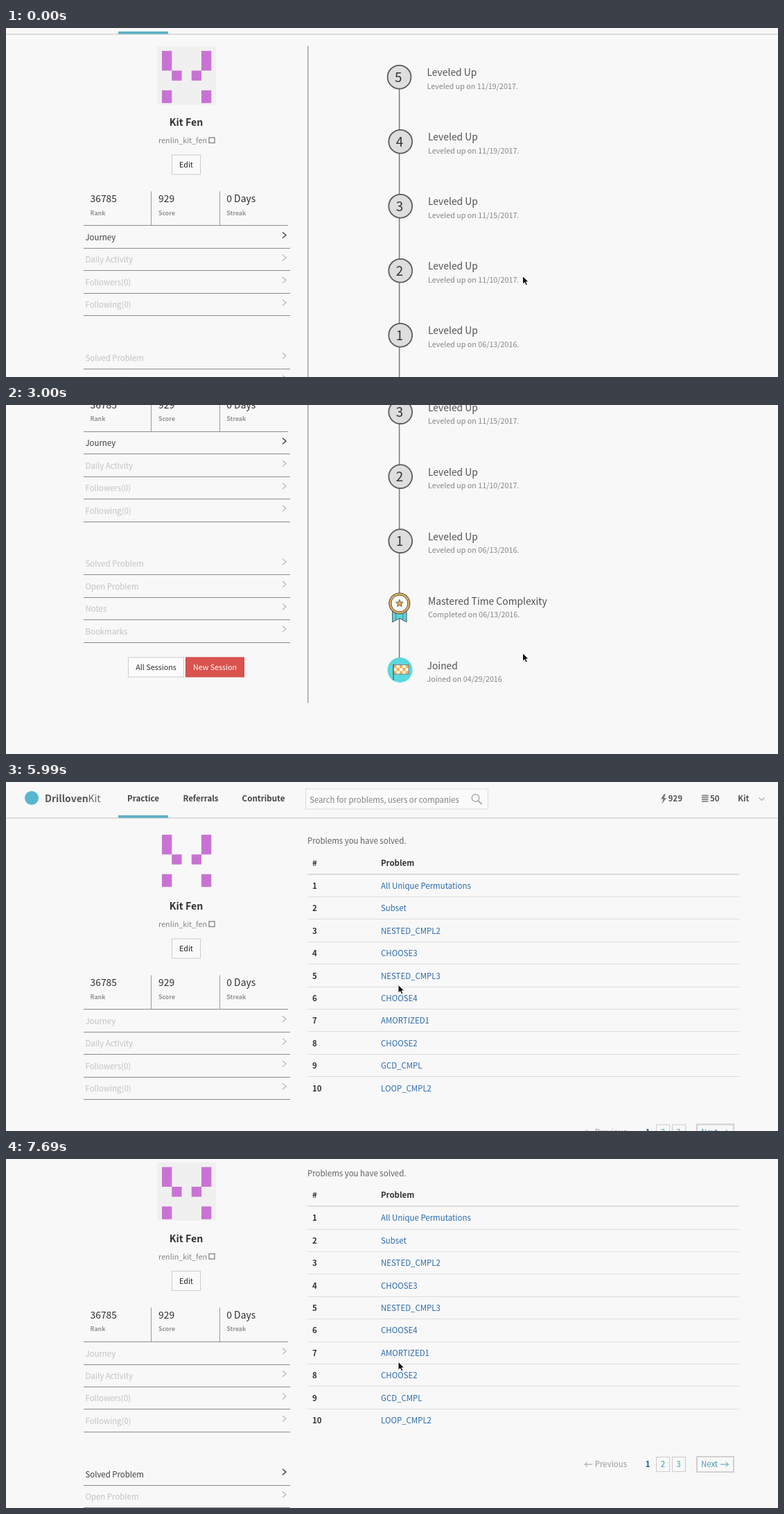
An HTML page for the animation above (8 s loop, 1114 by 503 pixels).

```html
<!DOCTYPE html>
<html lang="en">
<head>
<meta charset="utf-8">
<title>Profile page</title>
<style>
  html, body { margin: 0; width: 100%; height: 100%; overflow: hidden; background: #f8f8f8; }
  svg { display: block; width: 1114px; height: 503px; }
  text {
    font-family: "Noto Sans CJK SC", "Noto Sans CJK JP", "Noto Sans CJK KR", "Noto Sans CJK TC", "Noto Sans CJK", "Open Sans", sans-serif;
    white-space: pre;
  }
  .line { shape-rendering: crispEdges; }
  .row text { fill: #c2c2c2; }
  .row path { stroke: #b4b4b4; fill: none; stroke-width: 1.2; }
  .row.on text { fill: #3c3c3c; }
  .row.on path { stroke: #444; stroke-width: 1.4; }
</style>
</head>
<body>
<svg id="stage" viewBox="0 0 1114 503"></svg>
<script>
const LOOP = 8000;
const EM = 1 / 1.117; // sizes below are given for a face with smaller Latin letters
const ROW = 32.4;

// Drawing helpers
const text = (x, y, s, size, fill, opt = {}) =>
  `<text x="${x}" y="${y}" font-size="${(size * EM).toFixed(2)}"` +
  (fill ? ` fill="${fill}"` : '') +
  (opt.bold ? ' font-weight="700"' : '') +
  (opt.anchor ? ` text-anchor="${opt.anchor}"` : '') + `>${s}</text>`;
const bold = { bold: true };
const mid = { anchor: 'middle' };
const boldMid = { bold: true, anchor: 'middle' };
const rect = (x, y, w, h, fill, stroke = 'none', sw = 1) =>
  `<rect x="${x}" y="${y}" width="${w}" height="${h}" fill="${fill}" stroke="${stroke}" stroke-width="${sw}"/>`;
const circle = (x, y, r, fill, stroke = 'none', sw = 1) =>
  `<circle cx="${x}" cy="${y}" r="${r}" fill="${fill}" stroke="${stroke}" stroke-width="${sw}"/>`;
const path = (d, fill, stroke = 'none', sw = 1) =>
  `<path d="${d}" fill="${fill}" stroke="${stroke}" stroke-width="${sw}"/>`;
const hline = (x1, x2, y, color, h = 1) =>
  `<rect class="line" x="${x1}" y="${y - h / 2}" width="${x2 - x1}" height="${h}" fill="${color}"/>`;
const vline = (x, y1, y2, color, w = 1) => rect(x - w / 2, y1, w, y2 - y1, color);
const group = (id, body) => `<g id="${id}">${body}</g>`;

function header() {
  const y = -15;
  let s = hline(0, 1114, 8.9, '#dcdcdc', 2) + rect(162, 5, 72, 3.7, '#5eb0c3');
  s += circle(37, -20, 10, '#56b7cf');
  s += text(56, -13.8, 'Drilloven', 15.6, '#555', bold) + text(118.5, -13.8, 'Kit', 15.6, '#666');
  s += text(198, y, 'Practice', 12.9, '#444', boldMid);
  s += text(281, y, 'Referrals', 12.9, '#444', boldMid);
  s += text(371.5, y, 'Contribute', 12.9, '#444', boldMid);
  s += rect(432.5, -33, 263, 29, '#fafafa', '#ddd');
  s += text(438, -13.5, 'Search for problems, users or companies', 12.75, '#828282');
  s += circle(677.5, -20, 5.3, 'none', '#aaa', 1.5) + path('M681.5-16l5 5', 'none', '#aaa', 2);
  s += path('M949.5-25.5l-4.5 7h3.4l-2 7 6.6-8.5h-3.6l2.6-5.5z', '#777');
  s += text(955.5, y, '929', 13, '#555', bold);
  for (let i = 0; i < 4; i++) s += rect(1004, -24.5 + i * 2.8, 9.5, 1.9, '#8c8c8c');
  s += text(1016, y, '50', 13, '#555', bold) + text(1056, y, 'Kit', 13, '#555', bold);
  return s + path('M1086.5-20.5l4 4 4-4', 'none', '#aaa', 1.1);
}

function menuRow(id, label, y) {
  const c = y - 19;
  return `<g id="${id}" class="row">${text(114.5, y - 11.5, label, 12.75)}` +
    `<path d="M399 ${c - 4.3}l5 4.3l-5 4.3"/></g>` + hline(112, 410, y, '#8c8c8c');
}

function profile() {
  let s = `<rect id="avatar" x="218" y="26" width="85" height="84.5" fill="#f0f0f0"/>`;
  const cells = [[0, 0, 28.4], [4, 0, 28.4], [1, 2, 14.4], [3, 2, 14.4], [0, 4, 18.4], [4, 4, 18.4]];
  for (const [cx, cy, h] of cells)
    s += rect(225 + cx * 14.25, 33 + cy * 14.2, 14.3, h, '#c873d3');
  s += text(260, 141.3, 'Kit Fen', 15.8, '#333', boldMid);
  s += text(290, 166, 'renlin_kit_fen', 12, '#858585', { anchor: 'end' });
  s += rect(293, 158, 8, 7.5, 'none', '#888', 1.4);
  s += rect(239.5, 183, 41, 28, '#fafafa', '#ccc') + text(260, 201, 'Edit', 12, '#222', mid);
  [[121.5, '36785', 'Rank'], [220, '929', 'Score'], [318.3, '0 Days', 'Streak']].forEach(([x, value, label]) => {
    s += text(x, 251.2, value, 15.5, '#303030') + text(x, 269.9, label, 9.8, '#949494', bold);
  });
  s += vline(209.5, 235.5, 285, '#999') + vline(308.5, 235.5, 285, '#999') + hline(112, 407, 284.9, '#8c8c8c');
  ['Journey', 'Daily Activity', 'Followers(0)', 'Following(0)'].forEach((label, i) => {
    s += menuRow('top' + i, label, 317.5 + i * ROW);
  });
  ['Solved Problem', 'Open Problem', 'Notes', 'Bookmarks'].forEach((label, i) => {
    s += menuRow('low' + i, label, 491.5 + i * ROW);
  });
  s += rect(176.5, 610.5, 80, 28, '#fcfcfc', '#ccc') + text(216.5, 628.7, 'All Sessions', 12, '#333', mid);
  s += rect(259.5, 610.5, 84, 28, '#d9534f', '#d04843') + text(301.5, 628.7, 'New Session', 12, '#fff', mid);
  return s;
}

function medal(x, y) {
  let star = '';
  for (let i = 0; i < 10; i++) {
    const r = i % 2 ? 2.5 : 5.6, a = i * Math.PI / 5;
    star += `${i ? 'L' : 'M'}${(x + r * Math.sin(a)).toFixed(2)} ${(y - r * Math.cos(a)).toFixed(2)}`;
  }
  return path(`M${x - 10.2} ${y + 10}v17l10.2-5.5l10.2 5.5v-17z`, '#5bd3da', '#4a5a60', 1) +
    path(`M${x - 5} ${y + 13}v10.5m10 0v-10.5`, 'none', '#4a5a60', 0.7) +
    circle(x, y, 15, '#e9ad4d', '#555', 1.1) +
    circle(x, y, 11.9, '#fcfcfc', '#555', 1) + path(star + 'z', '#f0a840', '#555', 0.9);
}

function flag(x, y) {
  let s = circle(x, y, 18, '#5bd8dd') + rect(x - 9.5, y - 7.5, 22, 13.5, '#fff');
  for (let r = 0; r < 3; r++)
    for (let c = r % 2; c < 5; c += 2)
      s += rect(x - 9.5 + c * 4.4, y - 7.5 + r * 4.5, 4.4, 4.5, '#f2ad52');
  return s + rect(x - 9.5, y - 7.5, 22, 13.5, 'none', '#777', 0.9) +
    vline(x - 9.5, y - 8, y + 15, '#555', 1.2);
}

function journey() {
  const entry = (x, y, title, note) =>
    text(x, y - 1.8, title, 15.5, '#505050') + text(x, y + 16.6, note, 12, '#868686');
  let s = vline(435.8, 26, 676, '#8c8c8c', 1.2) + vline(567.6, 88, 612, '#777', 1.5);
  ['11/19/2017', '11/19/2017', '11/15/2017', '11/10/2017', '06/13/2016'].forEach((date, i) => {
    const y = 71 + i * 93, x = i ? 569.2 : 567.5;
    s += circle(x, y - 0.3, 16.9, '#dedede', '#5c5c5c', 1.8) + text(x - 1.2, y + 6.7, 5 - i, 21, '#333', mid);
    s += entry(i ? 609 : 607.5, y, 'Leveled Up', `Leveled up on ${date}.`);
  });
  s += medal(567.8, 532.6) + entry(609, 536, 'Mastered Time Complexity', 'Completed on 06/13/2016.');
  return s + flag(568.5, 628.5) + entry(607.5, 629, 'Joined', 'Joined on 04/29/2016');
}

function problems() {
  const names = ['All Unique Permutations', 'Subset', 'NESTED_CMPL2', 'CHOOSE3', 'NESTED_CMPL3',
    'CHOOSE4', 'AMORTIZED1', 'CHOOSE2', 'GCD_CMPL', 'LOOP_CMPL2'];
  const teal = '#4a9ab5', y = 465.7;
  let s = text(435, 46.1, 'Problems you have solved.', 12.8, '#606060');
  s += text(442, 77.7, '#', 12.75, '#333', bold) + text(541, 77.7, 'Problem', 12.75, '#333', bold);
  s += hline(435, 1058, 89.5, '#dcdcdc', 2);
  names.forEach((name, i) => {
    const base = 110.9 + i * ROW;
    s += text(442, base, i + 1, 12.75, '#333', bold) + text(541, base, name, 12.8, '#2a6aa9');
    if (i < 9) s += hline(435, 1058, 122.4 + i * ROW, '#dddddd');
  });
  s += path('M846 461.5h-11m4-3.5l-4 3.5l4 3.5', 'none', '#999', 1);
  s += text(896, y, 'Previous', 12.75, '#999', { anchor: 'end' });
  s += text(926, y, '1', 12.75, '#24557d', boldMid);
  s += rect(938.5, 451, 19, 21, 'none', '#ccc') + text(948, y, '2', 12.75, teal, mid);
  s += rect(961.5, 451, 19, 21, 'none', '#ccc') + text(970.5, y, '3', 12.75, teal, mid);
  s += rect(997, 450.5, 53, 22, 'none', '#d0d0d0', 2) + text(1003, y, 'Next', 12.75, teal);
  return s + path('M1031 461.5h11.5m-4-3.5l4 3.5l-4 3.5', 'none', teal, 1);
}

const arrow = path('M0 0V12L2.8 9.4L4.6 13.7L6.9 12.7L5.1 8.6H8.8Z', '#111', '#fff', 1);
const hand = path('M-2 1.2Q-.8-.6.4 1.2V5.2Q1.5 4.2 2.6 5.4Q3.8 4.6 4.8 6Q6.4 5.4 6.8 7.2V10Q6.4 12 5.4 13V15H-1.8V13.4' +
  'Q-4.8 10-5.3 8.4Q-4.6 6.6-2 9ZM.4 5.2V8M2.6 5.4V8M4.8 6V8', '#fff', '#222', 1);

const $ = id => document.getElementById(id);
$('stage').innerHTML = rect(0, 0, 1114, 503, '#f8f8f8') +
  group('page', header() + profile() + group('journey', journey()) + group('problems', problems())) +
  group('cursor', group('arrow', arrow) + group('hand', hand));

// [time, page offset, cursor x, cursor y]; a missing cursor keeps its last place
const steps = [
  [0, 0, 745.5, 357.4], [150, 4], [480, 14],
  [1530, 2], [1670, -22], [1820, -50], [1970, -76], [2110, -97], [2260, -108], [2410, -112],
  [2710, -142], [2860, -204], [3000, -246.6], [3150, -250],
  [3290, -250, 690, 334], [3440, -250, 550, 276], [3580, -250, 425, 222], [3730, -250, 345, 191],
  [3880, -250, 335, 212], [4030, -250, 332, 226], [4180, -250, 330.5, 233],
  [5550, -250, 330.5, 243], [5700, 43], [5840, 43, 460, 272], [5990, 43, 566, 292.3],
  [6890, 30.5], [7070, 14], [7220, 0], [7370, -11], [7530, -18], [7690, -21.4]
];
steps.forEach((s, i) => { if (s.length < 4) s.push(...steps[i - 1].slice(2)); });

const show = (id, on) => $(id).setAttribute('display', on ? 'inline' : 'none');
const move = (id, x, y) => $(id).setAttribute('transform', `translate(${x} ${y})`);

let last;
function draw(t) {
  const step = steps.findLast(s => s[0] <= t);
  if (step === last) return;
  last = step;
  const [time, offset, x, y] = step;
  const listed = time >= 5700, pointing = time >= 3880 && time < 5840;
  move('page', 0, offset);
  move('cursor', x, y);
  show('journey', !listed);
  show('problems', listed);
  show('hand', pointing);
  show('arrow', !pointing);
  show('avatar', time < 5700 || time > 6890);
  $('top0').classList.toggle('on', !listed);
  $('low0').classList.toggle('on', time >= 3880);
}

const start = performance.now();
function tick() {
  draw((performance.now() - start) % LOOP);
  requestAnimationFrame(tick);
}
tick();
</script>
</body>
</html>
```
